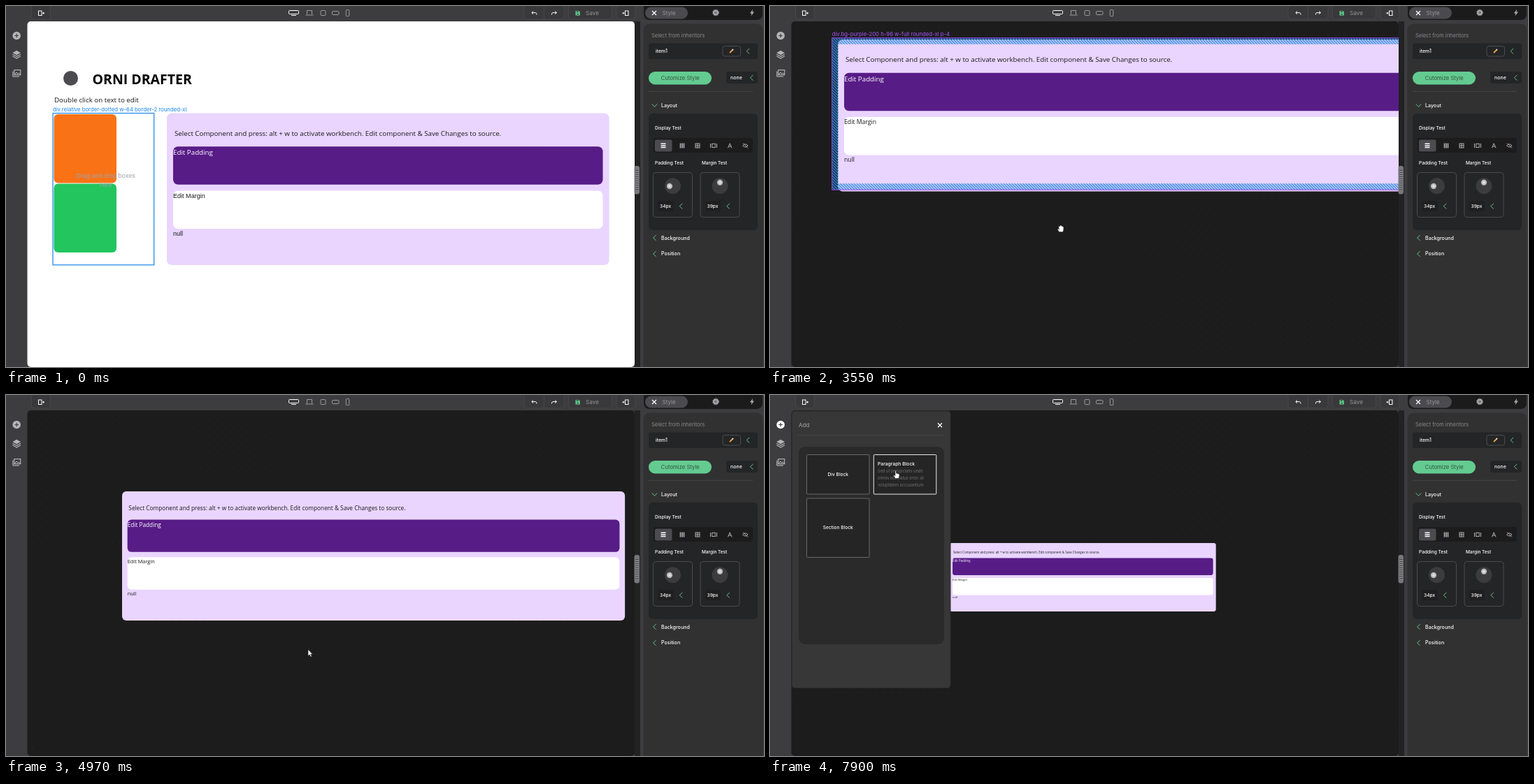
An HTML page for the animation above (8 s loop, 1084x517 px).

```html
<!DOCTYPE html>
<html lang="en">
<head>
<meta charset="utf-8">
<title>Page builder</title>
<style>
html, body { margin: 0; width: 100%; height: 100%; overflow: hidden; background: #3d3d3f; }
svg { display: block; width: 100vw; height: 100vh; font: 7px Inter, sans-serif; }
text { white-space: pre; }
.open { font: 9.75px "Open Sans", sans-serif; }
.plain { font: 9.06px "Liberation Sans", Arial, sans-serif; }
.wb .plain { font: 8.7px "Open Sans", sans-serif; }
.label { font-size: 7.76px; }
.bold { font-weight: 500; font-size: 6.6px; fill: #fff; }
.full { width: 632.5px; }
.row { width: 614.5px; }
.band { width: 623.5px; }
.wb .full { width: 846px; }
.wb .row { width: 828px; }
.wb .band { width: 837px; }
.wb #page, svg:not(.wb) #bench { display: none; }
.line { fill: none; stroke: #c8c8ca; }
.btn rect { fill: #39393b; stroke: #464649; }
.chev { fill: none; stroke: #6bcb94; stroke-width: .9; }
.card { fill: none; stroke: #4c4c4e; }
#cursor > * { fill: #fff; stroke: #222; stroke-width: .6; stroke-linejoin: round; }
</style>
</head>
<body>
<svg id="root" viewBox="0 0 1084 517" preserveAspectRatio="none">
  <defs>
    <clipPath id="view"><rect x="30.5" y="22" width="868.5" height="495" rx="5"/></clipPath>
    <pattern id="dots" x="33" y="25" width="11.33" height="11.33" patternUnits="userSpaceOnUse">
      <rect x="5" y="5" width="1" height="1" fill="#2a2a2a"/>
    </pattern>
    <pattern id="hatch" width="2.8" height="2.8" patternUnits="userSpaceOnUse" patternTransform="rotate(-45)">
      <rect width="1.5" height="2.8" fill="#2b8bdd"/>
    </pattern>
    <radialGradient id="knob"><stop offset="0" stop-color="#f2f2f2"/><stop offset="1" stop-color="#a5a5a5"/></radialGradient>
    <path id="chev" class="chev" d="M2.2 -3.8L-2 0L2.2 3.8"/>
    <path id="cross" d="M-3 -3L3 3M3 -3L-3 3" stroke="#fff" stroke-width="1.3"/>
  </defs>

  <!-- canvas area -->
  <rect x="899" y="22" width="8" height="495" fill="#222223"/>
  <g clip-path="url(#view)">
    <g id="bench">
      <rect x="30" y="22" width="870" height="495" fill="#1c1c1c"/>
      <rect x="30" y="22" width="870" height="495" fill="url(#dots)"/>
    </g>
    <g id="page">
      <rect x="30" y="22" width="870" height="495" fill="#fff"/>
      <circle cx="92.5" cy="103.5" r="10.5" fill="#4c4c50"/>
      <text x="123.5" y="111.5" style="font:700 19.5px 'Open Sans',sans-serif">ORNI DRAFTER</text>
      <text class="open" x="69" y="138" fill="#1b1b1b">Double click on text to edit</text>
      <rect x="67.5" y="153.5" width="143.5" height="217" rx="7" fill="none" stroke="#e2e2e6" stroke-dasharray="1 1"/>
      <rect x="68.5" y="155" width="89.5" height="98.5" rx="6" fill="#f97316"/>
      <rect x="68.5" y="254.5" width="89.5" height="98.5" rx="6" fill="#22c55e"/>
      <g class="plain" fill="#9ca3af" text-anchor="middle">
        <text x="142.5" y="246">Drag and drop boxes</text><text x="142.5" y="259">here</text>
      </g>
    </g>
    <g id="panel">
      <rect class="full" height="217.5" rx="7" fill="#e9d5ff"/>
      <rect class="row" x="9" y="47.7" height="54.5" rx="7" fill="#581c87"/>
      <rect class="row" x="9" y="111" height="54.5" rx="7" fill="#fff"/>
      <text class="open" x="11" y="32.3" fill="#1b1b1b">Select Component and press: alt + w to activate workbench. Edit component &amp; Save Changes to source.</text>
      <text class="open" x="9" y="59.7" fill="#fff">Edit Padding</text>
      <g class="plain" fill="#1b1b1b"><text x="9" y="121">Edit Margin</text><text x="9" y="175.3">null</text></g>
    </g>
    <g id="mark">
      <rect class="band" x="4.5" y="4.5" height="208.5" fill="none" stroke="url(#hatch)" stroke-width="9"/>
      <rect class="full" height="217.5" fill="none" stroke="#9a45f5"/>
      <text id="tag" class="label" fill="#a855f7">div.bg-purple-200 h-96 w-full rounded-xl p-4</text>
    </g>
    <g id="boxHover" stroke="#1a86ee" fill="none">
      <rect x="67" y="153.5" width="144.7" height="217.3" stroke-width="1.2"/>
      <text class="label" x="67" y="151" fill="#1a86ee" stroke="none">div.relative border-dotted w-64 border-2 rounded-xl</text>
    </g>
    <rect id="pageHover" x="31" y="22.5" width="867.5" height="432" fill="none" stroke="#1a86ee"/>
  </g>
  <rect x="898.5" y="229" width="7.5" height="40.5" rx="3" fill="#77777c"/>
  <path d="M900 249.5H905" stroke="#a9a9ae" stroke-width="28" stroke-dasharray="none" opacity=".25"/>
  <path d="M902.5 235V264" stroke="#4a4a4e" stroke-width="5" stroke-dasharray="1 2"/>

  <!-- top bar -->
  <g class="btn">
    <rect x="36.5" y="-4" width="27" height="23" rx="4"/><rect x="741" y="-4" width="57" height="23" rx="4"/>
    <rect x="804.5" y="-4" width="62" height="23" rx="4"/><rect x="873" y="-4" width="27" height="23" rx="4"/>
    <path d="M769.5 0V19" stroke="#464649"/>
  </g>
  <g class="line">
    <rect x="404.5" y="6.5" width="14" height="5" rx="1" stroke="#fff"/><path d="M408 13.5H415" stroke="#fff"/>
    <g stroke="#9c9c9f">
      <path d="M430.5 12V6.5H437.5V12M428.5 13H439.5"/>
      <rect x="450" y="6.5" width="7" height="7" rx="1.2"/><rect x="466.5" y="7.5" width="9.5" height="5" rx="1.3"/>
      <rect x="486.3" y="5.5" width="4.5" height="9" rx="1"/>
    </g>
    <g id="dock" stroke="#fff"><rect x="46.5" y="7" width="4.5" height="6.5"/><path d="M52 10.2H55M53.6 8.7V11.7"/></g>
    <g stroke="#fff"><rect x="885.5" y="7" width="4.5" height="6.5"/><path d="M881.5 10.2H884.5M883 8.7V11.7"/>
      <path d="M754 7.5L751.8 9.6L754 11.7M752 9.6H757.3Q759 9.7 759 12.5"/>
      <path d="M785.2 7.5L787.4 9.6L785.2 11.7M787.2 9.6H782Q780.3 9.7 780.3 12.5"/></g>
  </g>
  <path d="M814.5 7H819.3L820.8 8.5V13.5H814.5Z" fill="#5fd08d"/><path d="M815.8 8.4H818.8M816.5 11.6H819" stroke="#333" stroke-width="1.1"/>
  <text x="829" y="13" fill="#949497" font-size="8.2">Save</text>

  <!-- left rail -->
  <circle id="plus" cx="15.2" cy="42.5" r="5.8"/>
  <path d="M12.4 42.5H18M15.2 39.7V45.3" stroke="#3d3d3f" stroke-width="1.2"/>
  <g fill="#b4b4b6"><path d="M15.2 63.8L21 67L15.2 70.2L9.4 67Z"/>
    <path d="M9.4 69.2L15.2 72.4L21 69.2M9.4 71.8L15.2 75L21 71.8" fill="none" stroke="#b4b4b6" stroke-width="1.2"/></g>
  <g class="line" stroke-width="1"><rect x="11.8" y="91.7" width="9" height="7"/><path d="M9.9 93.5V101H19M12.5 98L15 95L17 97.3L18.3 96L20.5 98"/></g>

  <!-- style sidebar -->
  <path d="M912 0H1082V11Q1082 20 1073 20H921Q912 20 912 11Z" fill="#1b1b1c"/>
  <rect x="914" y="1.5" width="61" height="17" rx="8.5" fill="#4a4a4f"/>
  <use href="#cross" x="927" y="10"/>
  <text x="938.5" y="13" font-size="8" fill="#98989c">Style</text>
  <circle cx="1015" cy="9.5" r="3" fill="#777" stroke="#aaaaad" stroke-width="2"/>
  <circle cx="1015" cy="9.5" r="4.4" fill="none" stroke="#aaaaad" stroke-dasharray="1.4 1.4"/>
  <path d="M1068.2 4.8L1063.8 10.4H1066.3L1065.6 14.3L1070 8.6H1067.4Z" fill="#aaaaad"/>
  <rect x="911.5" y="25.5" width="171" height="500" rx="9" fill="#313132"/>
  <text x="923" y="45.3" font-size="7.5" fill="#89898c">Select from inheritors</text>
  <g fill="#242526">
    <rect x="919" y="53.5" width="156" height="22.5" rx="3"/><rect x="1030" y="94" width="45" height="17" rx="3"/>
    <rect x="919" y="154" width="156" height="167" rx="6"/>
  </g>
  <text class="bold" x="929" y="66.7" style="font-size:6.9px">item1</text>
  <rect x="1025" y="57.5" width="25.5" height="14.5" rx="3" class="card"/>
  <path d="M1035 67L1039.5 62.5" stroke="#f0a34a" stroke-width="1.8"/><path d="M1038.8 63.2L1040 62" stroke="#f3dccb" stroke-width="1.8"/>
  <use href="#chev" x="1061" y="64.7"/>
  <rect x="919" y="94" width="90" height="18.5" rx="9.2" fill="#63cb90"/>
  <text x="964.3" y="106" font-size="7.7" fill="#34533f" text-anchor="middle">Cutomize Style</text>
  <text class="bold" x="1036" y="105" style="font-size:7px">none</text>
  <use href="#chev" x="1066.3" y="102.7"/>
  <path d="M919 122.3H1068" stroke="#454547"/>
  <use href="#chev" transform="translate(927.5 142.5) rotate(-90)"/>
  <g class="bold" style="font-size:7.1px">
    <text x="937" y="145">Layout</text><text x="937" y="334.6">Background</text><text x="937" y="357.4">Position</text>
  </g>
  <use href="#chev" x="927.5" y="332"/><use href="#chev" x="927.5" y="355"/>
  <text class="bold" x="928" y="177.3" style="font-size:6.5px">Display Test</text>
  <rect x="926" y="189" width="142" height="21" rx="3" fill="#1c1c1d"/>
  <rect x="928" y="191.5" width="24.5" height="17" rx="2" fill="#4b4b50"/>
  <path d="M936.5 197.3H943.5M936.5 199.9H943.5M936.5 202.5H943.5" stroke="#fff" stroke-width="1.5"/>
  <g class="line" stroke-width="1" style="stroke:#b0b0b3">
    <path d="M964.5 196.5V203.5M967 196.5V203.5M969.5 196.5V203.5" stroke-width="1.6"/>
    <rect x="986" y="197" width="6" height="6"/><path d="M986 200H992M989 197V203"/>
    <path d="M1007.5 197V203M1016.5 197V203"/><rect x="1009.8" y="197.3" width="4.4" height="5.2"/>
    <path d="M1032.5 203.3L1035.2 196.8L1038 203.3M1033.5 201H1037"/>
    <path d="M1053.5 200Q1057.3 195.8 1061 200Q1057.3 204 1053.5 200M1054 196.5L1061 203.5"/>
  </g>
  <text class="bold" x="928" y="226.8">Padding Test</text><text class="bold" x="995" y="226.8" style="font-size:6.45px">Margin Test</text>
  <g id="dials"></g>

  <!-- add drawer -->
  <g id="drawer">
    <rect x="31.5" y="23" width="226.5" height="396.5" rx="4" fill="#373738" stroke="#2c2c2d"/>
    <text x="41" y="46" font-size="8" fill="#aaaaac">Add</text>
    <use href="#cross" x="243" y="43.3"/>
    <path d="M40 57.5H249" stroke="#444446"/>
    <rect x="41" y="74" width="208" height="283" rx="9" fill="#2a2a2b"/>
    <g fill="#252526" stroke="#68686b">
      <rect x="52.5" y="85.5" width="89.5" height="56.5" rx="1"/><rect x="52.5" y="148" width="89.5" height="84.5" rx="1"/>
      <rect id="para" x="148.3" y="85.5" width="89.5" height="56.5" rx="1"/>
    </g>
    <g class="bold"><text x="97.3" y="116.3" text-anchor="middle">Div Block</text><text x="97.3" y="192.3" text-anchor="middle">Section Block</text>
      <text x="154" y="101.3" style="font-size:6.75px">Paragraph Block</text></g>
    <g font-size="5.7" fill="#707073"><text x="154" y="111.3">Sed ut perspiciatis unde</text>
      <text x="154" y="121.3">omnis iste natus error sit</text><text x="154" y="131.3">voluptatem accusantium</text></g>
  </g>

  <g id="cursor">
    <path id="arrow" d="M0 0V9.2L2.1 7.3L3.6 10.6L5.2 9.9L3.7 6.7H6.5Z"/>
    <path id="grab" d="M-2.6 4.6L-4.8 .9Q-5 -.6 -3.3 .2L-2.6 1L-3.4 -3Q-2.6 -4.4 -1.8 -3L-1.3 -4.4Q-.4 -5.4 .4 -4.3L1 -4.2Q2 -4.7 2.3 -3L2.8 -2.9Q4 -3.2 4 -1.6L3.8 2L2.7 4.8Z"/>
    <path id="point" d="M-1.8 6L-4.2 1.8Q-4.2 .4 -2.6 1.4L-2 2V-4.6Q-1.2 -6 -.4 -4.6V-1.2Q1.2 -1.8 1.5 -.8Q2.8 -1.2 3 -.2Q4.2 -.4 4.2 .9L3.6 4L2.9 6Z"/>
  </g>
</svg>
<script>
const $ = id => document.getElementById(id);
const show = (id, on) => $(id).style.display = on ? '' : 'none';
const place = (id, x, y, s = 1) => $(id).setAttribute('transform', `translate(${x} ${y}) scale(${s})`);
const mix = (a, b, p) => a.map((v, i) => v + (b[i] - v) * p);

// Count of steps taken at t, the first at `from` and the n-th at `to`.
const steps = (t, from, to, n) =>
  t < from ? 0 : Math.min(n, Math.floor((t - from) / (to - from) * (n - 1) + 1.2));
const glide = (t, from, to, n, a, b) => mix(a, b, steps(t, from, to, n) / n);

const dial = (x, value, kx, ky) => `
  <rect class="card" x="${x}" y="238.5" width="56" height="64" rx="4"/>
  <circle cx="${x + 28}" cy="257.7" r="11.5" fill="#3c3c3e"/>
  <circle cx="${x + kx}" cy="${ky}" r="4.2" fill="url(#knob)"/>
  <rect x="${x + 7}" y="279" width="22" height="15" rx="2" fill="#1f1f20"/>
  <text class="bold" x="${x + 9.5}" y="289">${value}px</text>
  <use href="#chev" x="${x + 39.7}" y="286.7"/>`;
$('dials').innerHTML = dial(925.5, 34, 23.5, 258) + dial(993, 39, 28, 252.7);

const drag = [[0, 0], [55, 15], [105, 38], [132, 64], [138, 72], [122, 75], [100, 74], [82, 74], [71, 75]];
const swirl = [[346, 209], [310, 203], [267, 202], [222, 218], [203, 245], [222, 250], [246, 232], [257, 212]];

function panelAt(t) {
  if (t < 2230) return [230, 153.5, 1];
  if (t < 4450) {
    const [x, y] = drag[steps(t, 3550, 4250, 8)];
    return [42 + x, 33 + y, 1];
  }
  if (t < 4970) return [111, 112.5, 1];
  if (t < 5080) return [166, 138, .85];
  if (t < 5370) return [221, 163, .7];
  return [...swirl[steps(t, 6100, 6690, 7)], .45];
}

function markAt(t, panel) {
  const k = steps(t, 3550, 4250, 8);
  if (!k || t > 4350) return panel;
  const [x, y] = mix(drag[k - 1], drag[k], .85);
  return [42 + x, 33 + y];
}

function cursorAt(t, [x, y]) {
  if (t < 2230) return ['arrow', ...glide(t, 100, 700, 7, [165, 395], [392.3, 361])];
  if (t < 3130) return ['arrow', ...glide(t, 2420, 2840, 5, [392.3, 361], [360.5, 301.5])];
  if (t < 4560) return ['grab', x + 319, y + 271];
  if (t < 4660) return ['arrow', 431, 374];
  if (t < 5880) return ['arrow', ...glide(t, 5570, 5880, 4, [432, 364.5], [438, 333])];
  if (t < 6880) return ['grab', x + 92, y + 129];
  if (t < 7390) return ['arrow', ...glide(t, 6880, 7390, 6, [349, 336], [14, 40])];
  return ['point', ...glide(t, 7690, 7900, 3, [16, 46], [181, 113.5])];
}

function draw(t) {
  $('root').classList.toggle('wb', t >= 2230);
  const panel = panelAt(t), mark = markAt(t, panel);
  place('panel', ...panel);
  place('mark', mark[0], mark[1]);
  $('tag').setAttribute('y', mark[1] < 35 ? 224.3 : -2.7);
  show('mark', t >= 500 && t < 4560);
  show('boxHover', t < 200);
  show('pageHover', t >= 200 && t < 500);
  show('drawer', t >= 7690);
  $('para').setAttribute('stroke', t >= 7890 ? '#e8e8ea' : '#68686b');
  $('plus').setAttribute('fill', t >= 7390 ? '#fff' : '#b4b4b6');
  const [kind, x, y] = cursorAt(t, panel);
  for (const id of ['arrow', 'grab', 'point']) show(id, id === kind && t >= 100);
  place('cursor', x, y);
}

const start = performance.now();
function tick(now) {
  draw(Math.max(0, now - start) % 8000);
  requestAnimationFrame(tick);
}
draw(0);
requestAnimationFrame(tick);
</script>
</body>
</html>
```
